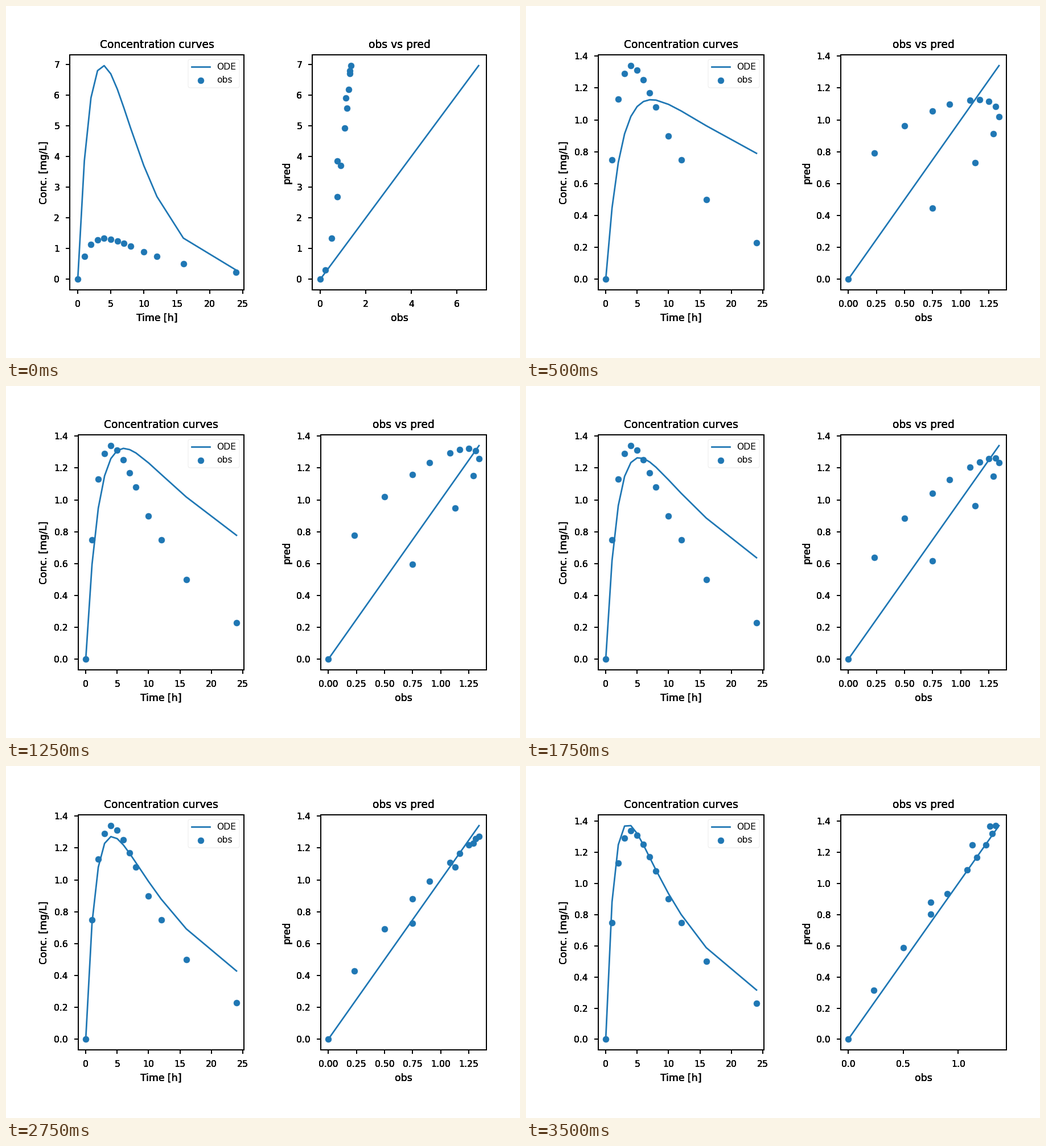
Write a matplotlib script that moves like this. It is 903 px wide and 620 px high and loops after 3.75 s.

```python
import numpy as np
import matplotlib.pyplot as plt
from matplotlib.animation import FuncAnimation

WIDTH, HEIGHT, DPI = 903, 620, 141.1
LAYOUT_DPI = 72
STEPS, STEP_MS = 15, 250
INK_PASSES = 4

plt.rcParams.update({
    "font.family": "DejaVu Sans",
    "font.size": 10,
    "axes.titlesize": 9.6,
    "axes.labelsize": 8.8,
    "legend.fontsize": 8,
    "xtick.labelsize": 8,
    "ytick.labelsize": 8,
    "xtick.major.pad": 5.6,
    "ytick.major.pad": 5.6,
    "xtick.major.width": 0.8,
    "ytick.major.width": 0.8,
    "lines.linewidth": 1.4,
    "lines.markersize": 5.6,
    "patch.linewidth": 0.24,
})

# Sampling times and the measured concentrations
hours = np.r_[0:9, 10, 12, 16, 24]
obs = np.array([0, 0.75, 1.13, 1.29, 1.34, 1.31, 1.25, 1.17, 1.08,
                0.90, 0.75, 0.50, 0.23])


def rates(step):
    """Amplitude, elimination and absorption rate at a fitting step."""
    if step == 0:  # the initial guess, far from the data
        return 33.75, 0.1955, 0.3455
    s = step - 2
    amp = np.interp(step, [1, 2, 4, 5, 7, 9, 11, 14],
                    [1.9, 1.44, 1.52, 1.75, 1.715, 1.855, 1.81, 2.03])
    ke = 0.025 + 0.00245 * s + 0.00016 * s**2
    ka = 0.408 + 0.018 * s + 0.0006 * s**2
    return amp, ke, ka


def concentration(step):
    """Oral dose in one compartment: absorption minus elimination."""
    amp, ke, ka = rates(step)
    return amp * (np.exp(-ke * hours) - np.exp(-ka * hours))


def overprint(artist):
    """Draw an artist several times so that its soft edges turn solid."""
    draw_once = artist.draw

    def draw(renderer):
        for _ in range(INK_PASSES):
            draw_once(renderer)

    artist.draw = draw


def label(ax, title, xlabel, ylabel):
    ax.set_title(title)
    ax.set_xlabel(xlabel)
    ax.set_ylabel(ylabel)


def arrange():
    """Lay out with coarse text metrics, then return to full resolution."""
    fig.set_dpi(LAYOUT_DPI)
    # The second pass settles margins that depend on the axes width
    for _ in range(2):
        fig.tight_layout(pad=3)
    fig.set_dpi(DPI)


# The tiny surplus guards against rounding down to one pixel less
fig = plt.figure(figsize=((WIDTH + 1e-6) / DPI, (HEIGHT + 1e-6) / DPI),
                 dpi=DPI, facecolor="white")


def update(step):
    fig.clf()
    left, right = fig.subplots(1, 2)
    pred = concentration(step)
    top = max(obs.max(), pred.max())

    left.plot(hours, pred, color="C0", label="ODE")
    left.scatter(hours, obs, color="C0", label="obs")
    left.legend(loc="upper right")
    label(left, "Concentration curves", "Time [h]", "Conc. [mg/L]")

    right.plot([0, top], [0, top], color="C0")
    right.scatter(obs, pred, color="C0")
    label(right, "obs vs pred", "obs", "pred")

    arrange()
    for ax in (left, right):
        for artist in (ax.xaxis, ax.yaxis, ax.title, *ax.spines.values()):
            overprint(artist)


anim = FuncAnimation(fig, update, frames=STEPS, init_func=lambda: None,
                     interval=STEP_MS, repeat=True, repeat_delay=0)
plt.show()
```
